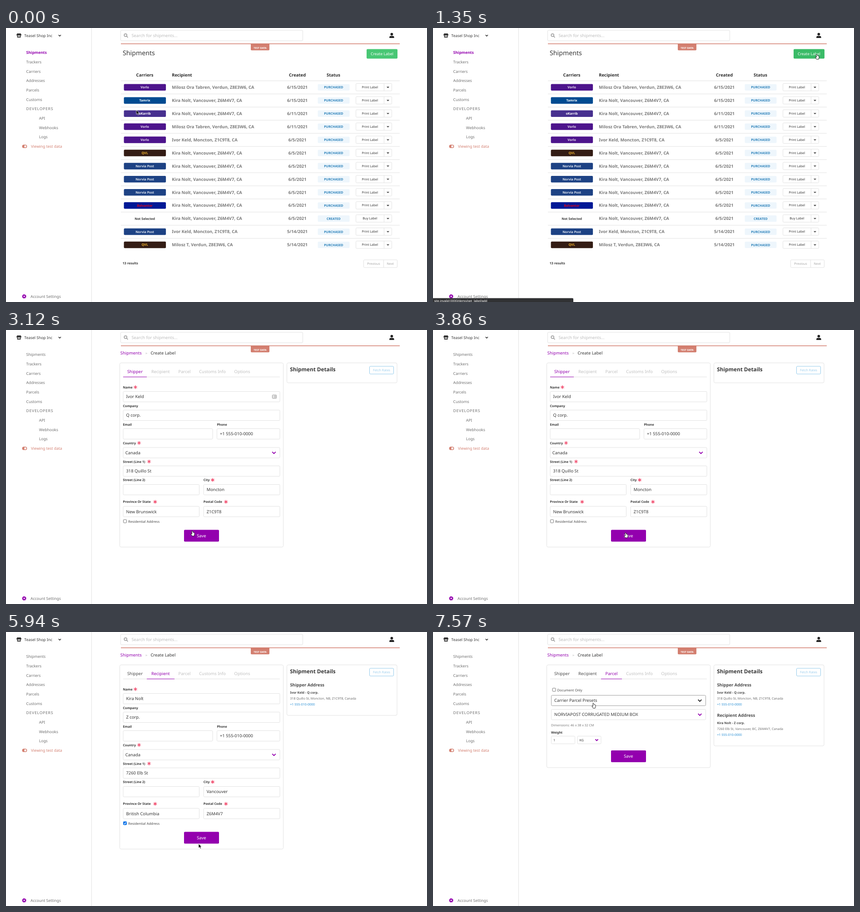
Write an HTML page that moves like this. It is 927 px wide and 604 px high and loops after 8 s.

```html
<!DOCTYPE html>
<html lang="en">
<head>
<meta charset="utf-8">
<title>Shipping dashboard</title>
<style>
  html, body { margin: 0; width: 100%; height: 100%; overflow: hidden; background: #fff; }
  svg { display: block; width: 100vw; height: 100vh; }
  text { font-family: "Noto Sans", "Open Sans", sans-serif; text-rendering: geometricPrecision; }
</style>
</head>
<body>
<svg id="stage" viewBox="0 0 927 604"></svg>
<script>
const LOOP = 8000;
const PURPLE = '#9300ae', SALMON = '#d37f70', LINE = '#e2e2e2', DARK = '#363636', GREY = '#6e6e6e', CELL = '#7a7a7a';
const SMALL = 7.05, MENU = 8.5, BASE = 9.4;

const BURSTS = [[180, 1210, 8], [1350, 2380, 8], [2530, 3420, 7], [3710, 4610, 7],
  [5060, 6090, 8], [6240, 7270, 8], [7420, 7570, 2]];

// Pointer path: time, x, y.
const PATH = [[0, 287, 181], [180, 300, 178], [474, 480, 140], [769, 790, 75], [916, 874, 57],
  [1063, 858, 57], [1210, 845, 58], [1350, 845, 58], [1497, 760, 64], [1644, 420, 110],
  [1790, 304, 128], [1939, 300, 140], [2380, 318, 150], [2530, 325, 165], [2826, 390, 370],
  [3120, 410, 443], [3420, 424, 447], [4010, 424, 447], [4460, 320, 170], [4610, 305, 151],
  [5060, 305, 151], [5500, 300, 180], [5795, 400, 420], [5940, 424, 467], [6090, 426, 462],
  [6240, 427, 456], [6534, 427, 456], [6976, 370, 230], [7270, 352, 178], [7420, 352, 168],
  [7570, 353, 157]];

const OPENED = 1490, SHIPPER_SAVED = 4000, FILLED = 5490, RECIPIENT_SAVED = 6530;

const PHONE = '+1 555-010-0000';
const SHIPPER = { name: 'Ivor Keld', company: 'Q corp.', phone: PHONE, street: '318 Quillo St',
  city: 'Moncton', state: 'New Brunswick', code: 'NB', postal: 'Z1C9T8' };
const RECIPIENT = { name: 'Kira Nolt', company: 'Z corp.', phone: PHONE, street: '7260 Elb St',
  city: 'Vancouver', state: 'British Columbia', code: 'BC', postal: 'Z6M4V7', residential: true };
const EMPTY = { state: 'Quebec' };

const CARRIERS = {
  vorlo: ['Vorlo', '#4d148c', '#e8e0f0'], tamrix: ['Tamrix', '#004b91', '#fff'],
  okarrib: ['oKarrib', '#47308f', '#fff'], qvl: ['QVL', '#331c14', '#f5b52b'],
  norvia: ['Norvia Post', '#1d4284', '#e0e6f0'], belvanter: ['Belvanter', '#001996', '#e0001a'],
  none: ['Not Selected', '#fff', DARK]
};
const place = p => `${p.name}, ${p.city}, ${p.postal}, CA`;
const TO_KIRA = place(RECIPIENT), TO_IVOR = place(SHIPPER);
const TO_MILOSZ = 'Milosz Ora Tabren, Verdun, Z8E3W6, CA';
const ROWS = [
  ['vorlo', TO_MILOSZ, '6/15/2021'], ['tamrix', TO_KIRA, '6/15/2021'],
  ['okarrib', TO_KIRA, '6/11/2021'], ['vorlo', TO_MILOSZ, '6/11/2021'],
  ['vorlo', TO_IVOR, '6/5/2021'], ['qvl', TO_KIRA, '6/5/2021'],
  ['norvia', TO_KIRA, '6/5/2021'], ['norvia', TO_KIRA, '6/5/2021'],
  ['norvia', TO_KIRA, '6/5/2021'], ['belvanter', TO_KIRA, '6/5/2021'],
  ['none', TO_KIRA, '6/5/2021'], ['norvia', TO_IVOR, '5/14/2021'],
  ['qvl', 'Milosz T, Verdun, Z8E3W6, CA', '5/14/2021']
];

let pointer;

const text = (x, y, s, size = BASE, fill = DARK, weight = 400, anchor = 'start', extra = '') =>
  `<text x="${x}" y="${y}" font-size="${size}" fill="${fill}" font-weight="${weight}" text-anchor="${anchor}" ${extra}>${s}</text>`;
const centered = (x, y, s, size, fill, weight) => text(x, y, s, size, fill, weight, 'middle');
const rect = (x, y, w, h, fill, stroke = 'none', r = 2) =>
  `<rect x="${x}" y="${y}" width="${w}" height="${h}" rx="${r}" fill="${fill}" stroke="${stroke}"/>`;
const path = (d, stroke, width = 1, fill = 'none') =>
  `<path d="${d}" fill="${fill}" stroke="${stroke}" stroke-width="${width}"/>`;
const circle = (x, y, r, fill, rest = '') => `<circle cx="${x}" cy="${y}" r="${r}" fill="${fill}" ${rest}/>`;
const chevron = (x, y, half, color, width) =>
  path(`M${x - half} ${y - half / 2}l${half} ${half} ${half} ${-half}`, color, width);
const asterisk = (x, y) =>
  path(`M${x} ${y - 4}v8M${x - 3.5} ${y - 2}l7 4M${x - 3.5} ${y + 2}l7 -4`, '#f14668', 1.4);

// Reports whether the pointer is inside a control and picks its shape.
function over(x, y, w, h, kind) {
  const inside = pointer.x >= x && pointer.x <= x + w && pointer.y >= y && pointer.y <= y + h;
  if (inside) pointer.kind = kind;
  return inside;
}

function field(x, y, w, value = '', h = 23, size = BASE) {
  const hover = over(x, y, w, h, 'beam');
  return rect(x, y, w, h, '#fff', hover ? '#a5a5a5' : LINE)
    + text(x + (size < BASE ? 4.5 : 6.5), y + h / 2 + size * .36, value, size);
}

function select(x, y, w, value, inset = 6.5, h = 23, size = BASE) {
  const hover = over(x, y, w, h, 'hand');
  return rect(x, y, w, h, '#fff', hover ? '#a0a0a0' : LINE)
    + text(x + inset, y + h / 2 + size * .36, value, size)
    + chevron(x + w - (h < 20 ? 9.5 : 13), y + h / 2, h < 20 ? 3 : 3.8, hover ? '#222' : PURPLE, 1.9);
}

function saveButton(y) {
  over(392, y, 77, 26, 'hand');
  return rect(392, y, 77, 26, PURPLE) + centered(430.4, y + 16.3, 'Save', BASE, '#fff');
}

function checkbox(x, y, label, checked) {
  return rect(x - 3.5, y - 3.8, 7, 7, checked ? '#0b73e8' : '#fff', checked ? '#0b73e8' : '#777', 1.2)
    + (checked ? path(`M${x - 2} ${y}l1.5 1.6 2.8 -3.6`, '#fff', 1.2) : '')
    + text(x + 7, y + 3.2, label, 7.5, '#4a4a4a');
}

function frameChrome(onList) {
  const menu = ['Shipments', 'Trackers', 'Carriers', 'Addresses', 'Parcels', 'Customs', 'DEVELOPERS',
    'API', 'Webhooks', 'Logs'];
  const items = menu.map((label, i) => {
    const active = onList && i === 0;
    return text(i > 6 ? 72.8 : 44.6, 57.4 + i * 20.64, label, MENU, active ? PURPLE : GREY,
      active ? 600 : 400, 'start', i === 6 ? 'letter-spacing=".8"' : '');
  }).join('');
  return rect(0, 0, 927, 604, '#fff', 'none', 0)
    + path('M188.5 0V604', LINE)
    + path('M24.5 12h8l1.6 3.2q-.4 1.3-1.6 1.2v4.6h-8v-4.6q-1.2.1-1.6-1.2z', 'none', 0, DARK)
    + rect(26, 16.6, 5, 2.2, '#fff', 'none', 0)
    + text(40.3, 20, 'Teasel Shop Inc', MENU) + chevron(118.3, 16.5, 2.6, DARK, 1.6)
    + items
    + rect(35.5, 257.2, 10.8, 7.4, SALMON, 'none', 3.7) + circle(42.5, 260.9, 2.3, '#fff')
    + text(55, 264, 'Viewing test data', MENU, SALMON)
    + circle(40, 591.6, 2.7, 'none', `stroke="${PURPLE}" stroke-width="2.4"`)
    + circle(40, 591.6, 4, 'none', `stroke="${PURPLE}" stroke-width="1.4" stroke-dasharray="1.8 1.34"`)
    + text(54, 594.8, 'Account Settings', MENU, GREY)
    + rect(252.5, 5, 401, 23, '#fff', LINE)
    + circle(263.2, 15.8, 3, 'none', 'stroke="#999" stroke-width="1.5"') + path('M265.4 18l3 3', '#999', 1.7)
    + text(276.4, 20.1, 'Search for shipments...', BASE, '#bdbdbd')
    + circle(849.4, 13.6, 2.9, '#222')
    + path('M844.2 22v-1.6q0-3 3-3h4.4q3 0 3 3v1.6z', 'none', 0, '#222')
    + path('M253 34.7H867', SALMON, 1.5)
    + path('M539 35h41v12.2q0 2-2 2h-37q-2 0-2-2z', 'none', 0, SALMON)
    + centered(559.5, 46, 'TEST DATA', 5.6, '#fff', 600);
}

function tableRow([carrier, recipient, date], i) {
  const y = 130.7 + i * 28.94, pending = carrier === 'none';
  const [name, fill, color] = CARRIERS[carrier];
  return path(`M253 ${y - 14.3}H867`, LINE)
    + rect(259.6, y - 7.2, 92.5, 14.5, fill) + centered(305.6, y + 2.5, name, SMALL, color, 700)
    + text(365.3, y + 3.3, recipient, BASE, CELL, 600)
    + centered(641.6, y + 3.3, date, BASE, CELL, 600)
    + rect(686.5, y - 7, 70, 14.1, '#eef6fc')
    + centered(721.3, y + 2.6, pending ? 'CREATED' : 'PURCHASED', SMALL, '#2a80b9', 700)
    + rect(770.5, y - 8.4, 79, 16.4, '#fff', LINE) + path(`M832.5 ${y - 8.4}v16.4`, LINE)
    + centered(801.3, y + 2.3, pending ? 'Buy Label' : 'Print Label', SMALL)
    + chevron(841, y - .3, 2, DARK, 1.5);
}

function listPage() {
  const hover = over(794, 46.5, 68, 21, 'hand');
  const head = (x, label, anchor = 'middle') => text(x, 107.4, label, 9.5, '#2c2c2c', 700, anchor);
  return text(257, 60, 'Shipments', 14.2)
    + rect(794, 46.5, 68, 21, hover ? '#3abb67' : '#48c774')
    + centered(828, 60.2, 'Create Label', MENU, '#fff')
    + head(305.6, 'Carriers') + head(365.2, 'Recipient', 'start') + head(641.6, 'Created') + head(721, 'Status')
    + ROWS.map(tableRow).join('')
    + text(256.8, 521.4, '13 results', SMALL, DARK, 600)
    + rect(787.5, 511, 74, 17, '#fff', LINE) + path('M831.5 511v17', LINE)
    + centered(809.4, 522, 'Previous', SMALL, '#a5a5a5') + centered(846.2, 522, 'Next', SMALL, '#a5a5a5');
}

function addressForm(tab, data, t) {
  const label = (x, y, s, star) => text(x, y + 2.6, s, SMALL, DARK, 700) + (star ? asterisk(star, y) : '');
  const nameHover = over(258, 135.5, 345, 23, 'beam');
  const autofill = rect(586.5, 143.3, 9, 7.4, '#fff', '#888', 1)
    + path('M588.3 146.2h1.8M588.3 148.2h1.8M591 145.4h3M591 147h3M591 148.6h3', '#888', .9);
  return label(257.6, 126, 'Name', 285) + field(258, 135.5, 345, data.name)
    + (tab === 0 && t > 1930 && t < 3410 ? autofill : '')
    + (tab === 1 && nameHover ? path('M586.5 147h7l-3.5 5.5z', 'none', 0, '#222') : '')
    + label(257.6, 167, 'Company') + field(258, 176.5, 345, data.company)
    + label(257.6, 208, 'Email') + field(258, 217.5, 197)
    + label(464.4, 208, 'Phone') + field(464.5, 217.5, 138.5, data.phone)
    + label(257.6, 249, 'Country', 293) + select(258, 259, 345, 'Canada', 4.8)
    + label(257.6, 290, 'Street (Line 1)', 315) + field(258, 299.5, 345, data.street)
    + label(257.6, 330.6, 'Street (Line 2)') + field(258, 340.5, 167.5)
    + label(434.8, 330.6, 'City', 455) + field(435.2, 340.5, 167.8, data.city)
    + label(257.6, 378.8, 'Province Or State', 328.4) + field(258, 388.7, 167.5, data.state)
    + label(434.8, 378.8, 'Postal Code', 484.3) + field(435.2, 388.7, 167.8, data.postal)
    + checkbox(262, 421.8, 'Residential Address', data.residential)
    + saveButton(440.5);
}

function parcelForm() {
  return checkbox(266.6, 127.6, 'Document Only')
    + select(260.5, 139.5, 340, 'Carrier Parcel Presets')
    + select(260.5, 170.5, 340, 'NORVIAPOST CORRUGATED MEDIUM BOX')
    + text(260, 208.4, 'Dimensions: 46 x 38 x 32 CM', SMALL, '#7a7a7a')
    + text(260, 223.7, 'Weight', SMALL, DARK, 700)
    + field(260.5, 229.5, 52, '1', 17, SMALL)
    + select(318, 229.5, 52, 'KG', 4.5, 17, SMALL)
    + saveButton(261);
}

function addressSummary(title, p, y) {
  return text(625.4, y, title, BASE, '#4a4a4a', 600)
    + text(625.4, y + 16, `${p.name} - ${p.company}`, SMALL, '#4a4a4a', 600)
    + text(625.4, y + 29, `${p.street}, ${p.city}, ${p.code}, ${p.postal}, Canada`, SMALL, GREY, 500)
    + text(625.4, y + 42, p.phone, SMALL, '#2a8fd4', 500);
}

function labelPage(t) {
  const tab = (t >= SHIPPER_SAVED) + (t >= RECIPIENT_SAVED);
  const tabs = [['Shipper', 284, 258, 310], ['Recipient', 340.3, 310, 371], ['Parcel', 393, 370, 416],
    ['Customs Info', 454.6, 416, 493], ['Options', 520, 493, 547]];
  const [, , from, to] = tabs[tab];
  return text(251.8, 54.3, 'Shipments', BASE, PURPLE) + text(307, 53.6, '&gt;', SMALL, '#a5a5a5')
    + text(318.4, 54.3, 'Create Label')
    + rect(250.5, 72.5, 360, tab === 2 ? 226.5 : 406, '#fff', LINE, 3)
    + rect(618.5, 72.5, 242.5, 44 + tab * 67.3, '#fff', LINE, 3)
    + path('M258 103.5H603', LINE) + path(`M${from} 103.5H${to}`, PURPLE, 1.2)
    + tabs.map(([s, x], i) =>
      centered(x, 95.1, s, BASE, i === tab ? PURPLE : i < tab ? '#4a4a4a' : '#c0c0c0')).join('')
    + (tab === 2 ? parcelForm() : addressForm(tab, tab === 0 ? SHIPPER : t < FILLED ? EMPTY : RECIPIENT, t))
    + text(625.3, 90.6, 'Shipment Details', 11.75, DARK, 600)
    + rect(800.5, 80, 53, 17, '#fff', '#94cbeb') + centered(827, 91.1, 'Fetch Rates', SMALL, '#9bcdec')
    + (tab > 0 ? addressSummary('Shipper Address', SHIPPER, 119.8) : '')
    + (tab > 1 ? addressSummary('Recipient Address', RECIPIENT, 187.1) : '');
}

function statusBar(t) {
  const opacity = t < 1060 ? 0 : Math.max(0, Math.min(1, (2200 - t) / 700));
  return `<g opacity="${opacity}">${rect(-3, 595.6, 312, 12, '#303133', 'none', 2)}
    ${text(2.5, 603.8, 'site.invalid:0000/demo/get_label/add', 7.2, '#fff', 400, 'start',
      'style="font-family:\'Liberation Sans\',sans-serif"')}</g>`;
}

const SHAPES = {
  arrow: path('M0 0V9.3L2.2 7.2 3.7 10.6 5.4 9.9 3.9 6.6H6.8Z', '#fff', .7, '#000'),
  hand: path('M-1.2.5Q0-.9.9.4L1.6 3 2.8 3.2 4 3.6 5 4.4Q5.4 7 4.4 9.3L4 11H-.4L-3 7Q-2.8 5-.6 6.4Z', '#111', .9, '#fff'),
  beam: path('M-2-4.5Q0-4.5 0-3Q0-4.5 2-4.5M0-3V3M-2 4.5Q0 4.5 0 3Q0 4.5 2 4.5M-1 1.3H1', '#222', 1)
};

function snap(t) {
  let snapped = 0;
  for (const [start, end, steps] of BURSTS) {
    if (t < start) break;
    const step = (end - start) / (steps - 1);
    snapped = start + Math.min(steps - 1, Math.floor((t - start) / step + .05)) * step;
  }
  return snapped;
}

function pointerAt(t) {
  const next = PATH.findIndex(([time]) => time > t);
  if (next < 0) {
    const [, x, y] = PATH[PATH.length - 1];
    return { x, y, kind: 'arrow' };
  }
  const [t0, x0, y0] = PATH[next - 1], [t1, x1, y1] = PATH[next];
  const k = (t - t0) / (t1 - t0);
  return { x: x0 + (x1 - x0) * k, y: y0 + (y1 - y0) * k, kind: 'arrow' };
}

function scene(t) {
  pointer = pointerAt(t);
  const onList = t < OPENED;
  const page = frameChrome(onList) + (onList ? listPage() : labelPage(t)) + statusBar(t);
  return `${page}<g transform="translate(${pointer.x} ${pointer.y})">${SHAPES[pointer.kind]}</g>`;
}

const stage = document.getElementById('stage');
const begin = performance.now();
let shown = -1;

function draw() {
  const t = snap((performance.now() - begin) % LOOP);
  if (t !== shown) {
    stage.innerHTML = scene(t);
    shown = t;
  }
  requestAnimationFrame(draw);
}
draw();
</script>
</body>
</html>
```
